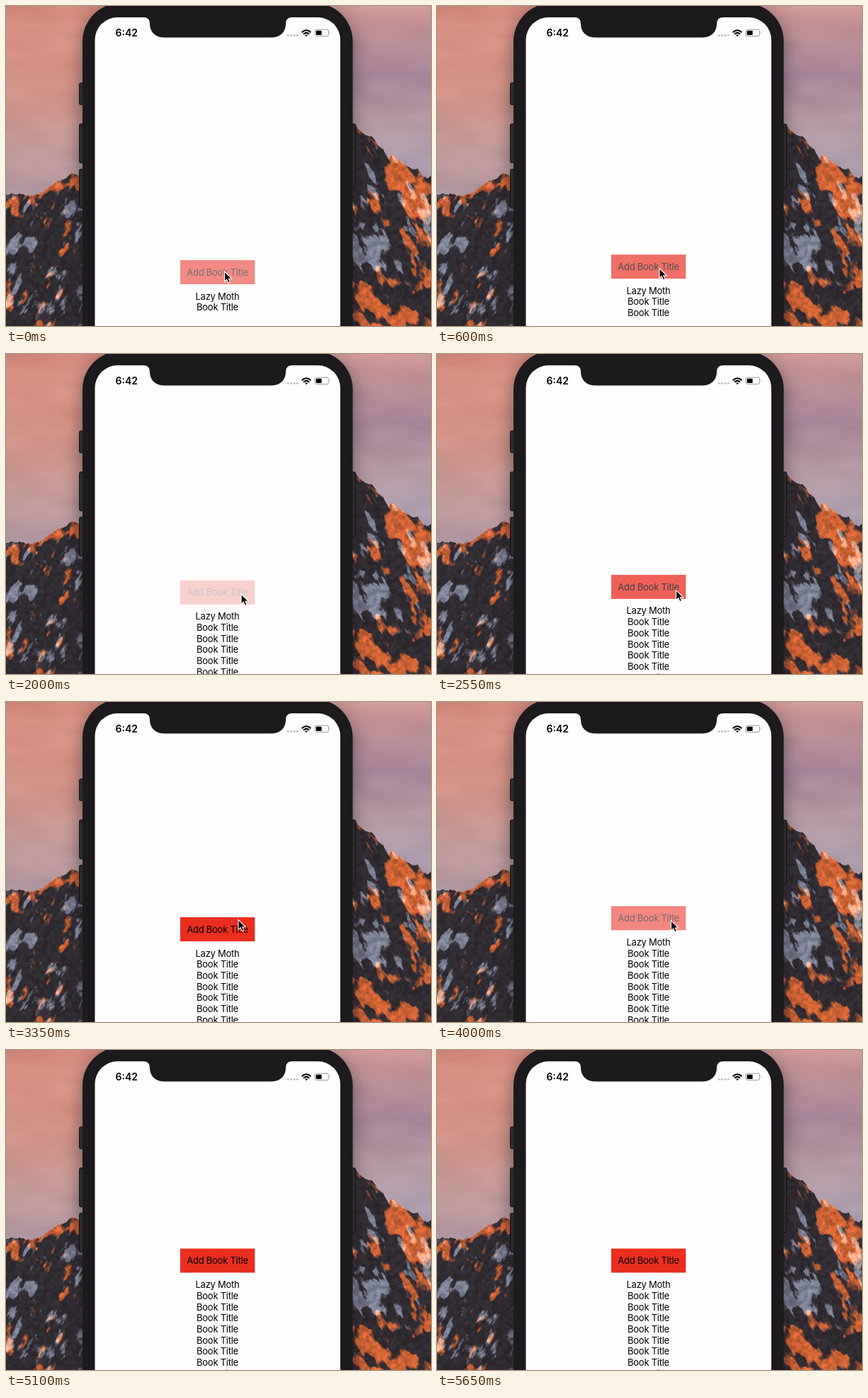
Write an HTML page with a canvas that moves like this. It is 600 px wide and 452 px high and loops after 5.7 s.

```html
<!DOCTYPE html>
<html lang="en">
<head>
<meta charset="utf-8">
<title>Book list</title>
<style>
  html, body { margin: 0; width: 100%; height: 100%; overflow: hidden; }
  canvas, svg { position: absolute; left: 0; top: 0; }
  text { font: 13px Inter, "Liberation Sans", sans-serif; letter-spacing: -.25px; text-anchor: middle; }
  .clock { font-size: 14px; font-weight: 600; letter-spacing: 0; text-anchor: start; }
  .phone { filter: drop-shadow(0 9px 13px rgba(30, 20, 28, .5)); }
</style>
</head>
<body>
<canvas id="scenery" width="600" height="452"></canvas>
<svg width="600" height="452" viewBox="0 0 600 452">
  <g class="phone">
    <g fill="#2b2a2d" stroke="#121113">
      <rect x="103.5" y="108.5" width="8" height="31" rx="2"/>
      <rect x="103.5" y="166.5" width="8" height="55" rx="2"/>
      <rect x="103.5" y="230.5" width="8" height="55" rx="2"/>
      <rect x="486" y="166.5" width="7.5" height="91" rx="2"/>
    </g>
    <rect x="108" y="-4" width="381.5" height="520" rx="54" fill="#1c1a1c"/>
  </g>
  <rect x="125.5" y="16" width="346.5" height="500" rx="32" fill="#fffdfe"/>
  <path fill="#1c1a1c" d="M194 15V16Q203 16 203 25C203 37 211 44.5 224 44.5H374C387 44.5 395 37 395 25Q395 16 404 16V15Z"/>
  <text class="clock" x="154.5" y="43">6:42</text>
  <g fill="#c4c2c4">
    <circle cx="398" cy="41.5" r="1.6"/><circle cx="402.5" cy="41.5" r="1.6"/>
    <circle cx="407" cy="41.5" r="1.6"/><circle cx="411.2" cy="41.5" r="1.6"/>
  </g>
  <g fill="none" stroke="#000" stroke-width="2">
    <path d="M417.6 37.2Q424 31.2 430.4 37.2M420 39.8Q424 36 428 39.8"/>
    <path d="M422 41L424 43.2L426 41Q424 39.8 422 41Z" fill="#000" stroke="none"/>
  </g>
  <rect x="436" y="33.2" width="19.5" height="9.4" rx="2.3" fill="none" stroke="#9b999b"/>
  <rect x="437.6" y="34.8" width="8" height="6.2" rx="1" fill="#000"/>
  <path d="M457 36.3q1.6 1.6 0 3.2z" fill="#9b999b"/>
  <g id="list">
    <g id="button">
      <rect x="246" width="105.3" height="34" fill="#ea2e20"/>
      <text x="298.5" y="21.7">Add Book Title</text>
    </g>
    <text x="298.5" y="55.6">Lazy Moth</text>
  </g>
  <path id="cursor" d="M0 0V14.2L3.2 11.2L5.4 16.2L7.9 15.1L5.8 10.3H10.2Z" fill="#000" stroke="#fff" stroke-width="1.1"/>
</svg>
<script>
const $ = id => document.getElementById(id);
const clamp = v => Math.max(0, Math.min(1, v));
const mix = (a, b, k) => a + (b - a) * k;
const mixColor = (a, b, k) => a.map((v, i) => mix(v, b[i], k));
const smooth = u => u * u * (3 - 2 * u);

// Interpolates rows of [key, ...values] at the given key.
function along(rows, key, ease = u => u) {
  let i = 1;
  while (i < rows.length - 1 && rows[i][0] < key) i++;
  const a = rows[i - 1], b = rows[i];
  return mixColor(a, b, ease(clamp((key - a[0]) / (b[0] - a[0])))).slice(1);
}

// ---- Scenery: dusk sky and rocky peaks ----
function hash(x, y) {
  let h = Math.imul(x, 374761393) + Math.imul(y, 668265263);
  h = Math.imul(h ^ h >>> 13, 1274126177);
  return ((h ^ h >>> 16) >>> 0) / 2 ** 32;
}
function noise(x, y) {
  const i = Math.floor(x), j = Math.floor(y), u = smooth(x - i), v = smooth(y - j);
  return mix(mix(hash(i, j), hash(i + 1, j), u), mix(hash(i, j + 1), hash(i + 1, j + 1), u), v);
}
function fbm(x, y) {
  let sum = 0;
  for (let k = 0, amp = .53; k < 4; k++, amp /= 2) sum += amp * noise(x * 2 ** k + k * 17, y * 2 ** k);
  return sum;
}
const skyLeft = [[0, 211, 139, 125], [120, 213, 151, 138], [185, 196, 152, 148], [270, 172, 148, 158]];
const skyRight = [[0, 205, 152, 149], [95, 165, 131, 150], [165, 182, 154, 163], [240, 168, 156, 174]];
const ridgeLeft = [[0, 268], [12, 265], [25, 268], [45, 265], [60, 257], [75, 247], [95, 235], [110, 240]];
const ridgeRight = [[486, 178], [493, 168], [503, 180], [515, 185], [532, 203], [540, 218], [544, 210], [565, 225], [580, 232], [590, 243], [600, 240]];
const ridgeFront = [[486, 382], [505, 389], [530, 405], [560, 420], [575, 429], [600, 433]];
// Soft patches: x, y, radius x, radius y, weight
const sunlit = [
  [14, 286, 36, 22, .8], [72, 256, 26, 13, .8], [103, 246, 14, 16, .7],
  [545, 235, 18, 32, .95], [582, 262, 28, 36, .8], [590, 325, 28, 50, .8], [520, 272, 10, 16, .4], [584, 385, 22, 25, .6]];
const snowy = [
  [28, 342, 24, 24, .42], [90, 285, 18, 28, .5], [18, 405, 18, 30, .48], [75, 375, 22, 28, .42], [80, 430, 28, 16, .45],
  [512, 262, 15, 25, .6], [500, 325, 24, 34, .65], [534, 360, 34, 26, .65], [585, 302, 22, 34, .6]];
const field = (spots, x, y) => spots.reduce((sum, [cx, cy, rx, ry, w]) =>
  sum + w * Math.exp(-(((x - cx) / rx) ** 2) - ((y - cy) / ry) ** 2), 0);
const patch = (level, grain) => clamp((level + (grain - .5) * 2.4 - .4) * 4);

function rock(x, y, front) {
  const slope = x < 300 ? .6 : -.55;
  const lit = patch(front ? .48 : field(sunlit, x, y), fbm((x + slope * y) / 16, (y - slope * x) / 30));
  const snow = front ? 0 : patch(field(snowy, x, y), fbm((x + slope * y) / 11 + 90, (y - slope * x) / 26));
  const stone = mixColor([49, 44, 50], [205, 98, 52], lit);
  const ice = mixColor([123, 128, 148], [240, 174, 142], lit);
  const grain = .7 + .6 * fbm(x / 5 + 40, y / 5);
  return mixColor(stone, ice, snow).map(v => v * grain);
}
function paintScenery() {
  const ctx = $('scenery').getContext('2d'), image = ctx.createImageData(600, 452);
  for (let x = 0; x < 600; x++) {
    if (x > 150 && x < 450) continue;
    const peaks = x < 112 ? ridgeLeft : x > 485 ? ridgeRight : null;
    const jag = (fbm(x / 7, 3) - .5) * 7;
    const top = peaks ? along(peaks, x)[0] + jag : 999;
    const front = x > 485 ? along(ridgeFront, x)[0] + jag : 999;
    for (let y = 0; y < 452; y++) {
      const cloud = (fbm(x / 90, y / 28) - .5) * 24;
      let color = along(x < 300 ? skyLeft : skyRight, y).map(v => v + cloud);
      if (y > top - 1) color = mixColor(color, rock(x, y, y > front), clamp(y - top + 1));
      image.data.set([...color, 255], (y * 600 + x) * 4);
    }
  }
  ctx.putImageData(image, 0, 0);
}
paintScenery();

// ---- Book list ----
const LOOP = 5700, ROW = 15.7, PRESS = 110, RELEASE = 250;
const taps = [-117, 272, 661, 1049, 1515, 1980, 2399, 2830, 3500, 3880, 4250];
const path = [[0, 308.5, 375], [1200, 319.5, 366], [2000, 332, 339], [2550, 337.5, 333.5],
  [3350, 328, 307.5], [4250, 331, 309], [4580, 625, -25]];
const rows = taps.map((_, i) => {
  const row = document.createElementNS('http://www.w3.org/2000/svg', 'text');
  row.setAttribute('x', 298.5);
  row.setAttribute('y', 55.6 + ROW * (i + 1));
  row.textContent = 'Book Title';
  return $('list').appendChild(row);
});
const inOut = u => u < .5 ? 2 * u * u : 1 - 2 * (1 - u) ** 2;

function draw(t) {
  const count = taps.filter(tap => tap <= t).length;
  const rise = inOut(clamp((t - taps[count - 1]) / RELEASE));
  const fall = count < taps.length ? inOut(clamp((t - taps[count] + PRESS) / PRESS)) : 0;
  $('button').setAttribute('opacity', mix(mix(.2, 1, rise), .2, fall));
  $('list').setAttribute('transform', `translate(0 ${359 - ROW / 2 * (count - 1)})`);
  rows.forEach((row, i) => row.setAttribute('visibility', i < count ? 'visible' : 'hidden'));
  $('cursor').setAttribute('transform', `translate(${along(path, t, smooth)})`);
}
const start = performance.now();
function tick() {
  const t = (performance.now() - start) % LOOP;
  draw(Math.floor(t / 50) * 50);
  requestAnimationFrame(tick);
}
tick();
</script>
</body>
</html>
```
